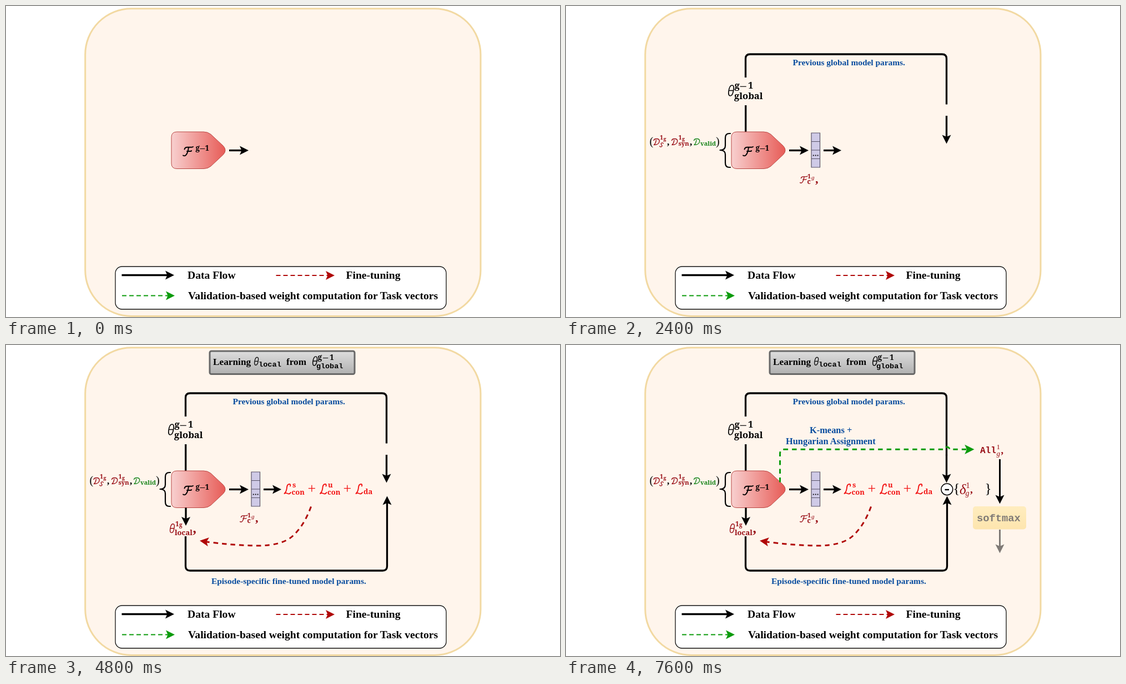
Animation of 998x561 px, one loop 8 s. Source, as an HTML page:

```html
<!DOCTYPE html>
<html lang="en">
<head>
<meta charset="utf-8">
<title>Local parameter learning</title>
<style>
html, body { margin: 0; width: 100%; height: 100%; overflow: hidden; background: #fff; }
svg { display: block; width: 100vw; height: 100vh; }
text { fill: currentColor; font: bold 19.6px "Liberation Serif", "Times New Roman", serif; white-space: pre; }
.math { font-family: "Noto Serif", serif; font-size: 13px; }
.it { font-weight: normal; font-style: italic; }
.thin { font-weight: normal; }
.mono { font-family: "Liberation Mono", "Courier New", monospace; }
.wine { color: #980c14; }
.brick { color: #b00808; }
.red { color: #f21212; }
.green { color: #0b9b0b; }
.leaf { color: #16841a; }
.blue { color: #084c9e; }
.line { fill: none; stroke: currentColor; stroke-width: 3.3; }
.fine { stroke-width: 3; }
.dash { stroke-width: 3; stroke-dasharray: 8.5 7; }
.key { stroke-width: 2; stroke-dasharray: 8 5; }
.pen { fill: none; stroke: currentColor; stroke-linecap: round; stroke-linejoin: round; }
.tip { fill: currentColor; }

/* each step: half opacity for 400 ms, then solid until the loop restarts */
.step { opacity: 0; animation: 8s step-end infinite; }
.s0 { animation-name: a0; } .s1 { animation-name: a1; } .s2 { animation-name: a2; }
.s3 { animation-name: a3; } .s4 { animation-name: a4; } .s5 { animation-name: a5; }
.s6 { animation-name: a6; } .s7 { animation-name: a7; } .s8 { animation-name: a8; }
.s9 { animation-name: a9; }
@keyframes a0 { 0% { opacity: 0 } 5% { opacity: .5 } 10%, 100% { opacity: 1 } }
@keyframes a1 { 0% { opacity: 0 } 15% { opacity: .5 } 20%, 100% { opacity: 1 } }
@keyframes a2 { 0% { opacity: 0 } 25% { opacity: .5 } 30%, 100% { opacity: 1 } }
@keyframes a3 { 0% { opacity: 0 } 35% { opacity: .5 } 40%, 100% { opacity: 1 } }
@keyframes a4 { 0% { opacity: 0 } 45% { opacity: .5 } 50%, 100% { opacity: 1 } }
@keyframes a5 { 0% { opacity: 0 } 55% { opacity: .5 } 60%, 100% { opacity: 1 } }
@keyframes a6 { 0% { opacity: 0 } 65% { opacity: .5 } 70%, 100% { opacity: 1 } }
@keyframes a7 { 0% { opacity: 0 } 75% { opacity: .5 } 80%, 100% { opacity: 1 } }
@keyframes a8 { 0% { opacity: 0 } 85% { opacity: .5 } 90%, 100% { opacity: 1 } }
@keyframes a9 { 0% { opacity: 0 } 95%, 100% { opacity: .5 } }
</style>
</head>
<body>
<svg viewBox="0 0 998 561" preserveAspectRatio="none">
  <defs>
    <linearGradient id="rose"><stop offset="0" stop-color="#f8d0cf"/><stop offset="1" stop-color="#e75c57"/></linearGradient>
    <linearGradient id="steel" x2="0" y2="1"><stop offset="0" stop-color="#dedede"/><stop offset="1" stop-color="#b0b0b0"/></linearGradient>
    <linearGradient id="gold" x2="0" y2="1"><stop offset="0" stop-color="#ffe592"/><stop offset="1" stop-color="#fcd570"/></linearGradient>
    <path id="tip" d="M0 0L-16 -8L-12.5 0L-16 8Z"/>
    <!-- math letters -->
    <path id="F" stroke-width="1.9" d="M4 5.5Q5 1.8 9 1.8H16Q18.5 1.8 19.5 .8M11.5 2Q10 13 6 16.5Q4 18 1.5 16.5M8.5 9H15Q16.2 9 16.7 8"/>
    <path id="L" stroke-width="1.9" d="M12 4.5Q13 1 10.5 1Q6.5 1 6 7Q5.5 14 1.5 18Q4 16.3 7.5 18Q11 19.5 13 16"/>
    <path id="D" stroke-width="1.4" d="M1 4Q2 1 6 1Q11.5 1 11.2 5.5Q10.5 12 1.5 12Q4.8 9 5.3 3.5"/>
    <path id="S" stroke-width="1.2" d="M7.5 2Q7 .6 5 .8Q2.5 1.2 3.5 3.5Q6 6 4.5 7.5Q2.5 9 .7 7"/>
    <path id="theta" stroke-width="1.7" d="M7.5 1Q11.5 1 10.5 8Q9 20 4.5 20Q.5 20 1.5 12Q3 1 7.5 1ZM2 10.5H10"/>
  </defs>

  <rect width="998" height="561" fill="#fff"/>
  <rect x="142.7" y="4.7" width="712.3" height="554.8" rx="83" fill="#fff5ec" stroke="#f2d9a2" stroke-width="3"/>

  <!-- legend -->
  <rect x="197" y="470" width="596" height="77" rx="12" fill="#fff" stroke="#111" stroke-width="1.3"/>
  <path class="line" d="M208.5 485.5H292"/>
  <use href="#tip" class="tip" transform="translate(303 485.5)"/>
  <g class="brick">
    <path class="line key" d="M486.5 486H580"/>
    <use href="#tip" class="tip" transform="translate(592 486)"/>
  </g>
  <g class="green">
    <path class="line key" d="M209 522.5H292"/>
    <use href="#tip" class="tip" transform="translate(304 522.5)"/>
  </g>
  <text x="327" y="492">Data Flow</text>
  <text x="612.5" y="492">Fine-tuning</text>
  <text x="328" y="529">Validation-based weight computation for Task vectors</text>

  <!-- top route, drawn beneath the encoder -->
  <g class="step s1">
    <path class="line" d="M323.7 228V179M323.5 129V95Q323.5 87 331.5 87H677.5Q685.5 87 685.5 95V177.5M685.5 198V238"/>
    <use href="#tip" class="tip" transform="translate(685.5 248.5) rotate(90)"/>
    <use href="#theta" class="pen" transform="translate(291.5 142)"/>
    <text class="math" x="303.5 328" y="149" style="font-size:16.5px">g1</text>
    <text class="math thin" x="312.5" y="153" style="font-size:24px">−</text>
    <text class="math" x="303" y="168" style="font-size:16.5px">global</text>
    <text class="blue" x="408.5" y="107" style="font-size:15.4px">Previous global model params.</text>
  </g>

  <!-- encoder -->
  <path d="M308 227H356Q363.5 227 369 231.5L391.5 252.5Q398.5 260.3 391.5 268L369 289Q363.5 293.5 356 293.5H308Q298 293.5 298 284V236.5Q298 227 308 227Z" fill="url(#rose)" stroke="#b84744"/>
  <use href="#F" class="pen" transform="translate(317.5 253)"/>
  <text class="math" x="341.5 358.5" y="261" style="font-size:13.5px">g1</text>
  <text class="math thin" x="348.5" y="263.5" style="font-size:19px">−</text>
  <path class="line" d="M402 260.5H426"/>
  <use href="#tip" class="tip" transform="translate(437 260.5)"/>

  <!-- data sets -->
  <g class="step s0">
    <path class="pen" stroke-width="2.2" d="M296 230H294Q287 230 287 238V252Q287 260 277.5 260Q287 260 287 268V283Q287 291 294 291H296"/>
    <text class="thin" x="150.5" y="251" style="font-size:20px">(</text>
    <text class="thin" x="270" y="251" style="font-size:20px">)</text>
    <g class="wine">
      <use href="#D" class="pen" transform="translate(157 238.5)"/>
      <use href="#S" class="pen" transform="translate(168 246)"/>
      <text class="math" x="169" y="241" style="font-size:11px">1</text>
      <text class="math" x="175.5" y="242.5" style="font-size:9px">g</text>
      <use href="#D" class="pen" transform="translate(189.5 238.5)"/>
      <text class="math" x="202.5" y="241" style="font-size:11px">1</text>
      <text class="math" x="209" y="242.5" style="font-size:9px">g</text>
      <text class="math" x="202.5" y="251.5" style="font-size:11px">syn</text>
    </g>
    <text x="182 223" y="250.5" style="font-size:17px">,,</text>
    <g class="leaf">
      <use href="#D" class="pen" transform="translate(229.5 238.5)"/>
      <text class="math" x="242" y="251.5" style="font-size:11px">valid</text>
    </g>
  </g>

  <!-- feature vector -->
  <g class="step s2">
    <path d="M442 229H457.5V291H442ZM442 244.5H457.5M442 260H457.5M442 275.5H457.5" fill="#cfcae7" stroke="#575266" stroke-width="1.2"/>
    <path class="pen" stroke-width="2.2" d="M445.8 269.5h0M449.7 269.5h0M453.6 269.5h0"/>
    <path class="line" d="M464 260.5H485"/>
    <use href="#tip" class="tip" transform="translate(496 260.5)"/>
    <g class="wine">
      <use href="#F" class="pen" transform="translate(420.5 306.5) scale(.74)"/>
      <text class="math" x="435" y="311" style="font-size:11px">1</text>
      <text class="it" x="442" y="312.5" style="font-size:11px">g</text>
      <text class="math" x="434.5" y="321" style="font-size:12px">c</text>
      <text x="449" y="318.5" style="font-size:22px">,</text>
    </g>
  </g>

  <!-- losses -->
  <g class="step s3">
    <g class="red">
      <use href="#L" class="pen" transform="translate(500 250)"/>
      <text class="math" x="516" y="257">s</text>
      <text class="math" x="514.5" y="269.5">con</text>
      <text class="thin" x="543.5" y="267" style="font-size:26px">+</text>
      <use href="#L" class="pen" transform="translate(564.5 250)"/>
      <text class="math" x="580" y="257">u</text>
      <text class="math" x="579" y="269.5">con</text>
      <text class="thin" x="607.5" y="267" style="font-size:26px">+</text>
      <use href="#L" class="pen" transform="translate(629 250)"/>
      <text class="math" x="644" y="268.5">da</text>
    </g>
    <g class="brick">
      <path class="line dash" d="M549.5 291.5Q537 326 516 345Q497 361.5 455 362Q410 361.5 361 355"/>
      <use href="#tip" class="tip" transform="translate(349 353) rotate(188)"/>
    </g>
  </g>

  <!-- title and local parameters -->
  <g class="step s4">
    <rect x="367" y="11" width="261" height="41.5" rx="3" fill="url(#steel)" stroke="#686868" stroke-width="3"/>
    <text x="373" y="36" style="font-size:17.3px">Learning</text>
    <use href="#theta" class="pen" transform="translate(446.7 21.5) scale(.74)"/>
    <text class="mono" x="455" y="39" style="font-size:13.6px">local</text>
    <text x="505" y="36" style="font-size:17.2px">from</text>
    <use href="#theta" class="pen" transform="translate(551.5 20) scale(.85)"/>
    <text class="math" x="561.5 583" y="27" style="font-size:14px">g1</text>
    <text class="math thin" x="570" y="30" style="font-size:20px">−</text>
    <text class="mono" x="559" y="42" style="font-size:13.4px">global</text>
    <path class="line" d="M324 293.5V315"/>
    <use href="#tip" class="tip" transform="translate(324 326) rotate(90)"/>
    <g class="wine">
      <use href="#theta" class="pen" transform="translate(294.5 322) scale(.83)"/>
      <text class="math" x="305" y="326.5" style="font-size:12px">1</text>
      <text class="math" x="312" y="328" style="font-size:10px">g</text>
      <text class="math" x="304" y="342.5">local</text>
      <text x="336.5" y="338.5" style="font-size:25px">,</text>
    </g>
  </g>

  <!-- bottom route -->
  <g class="step s5">
    <path class="line" d="M323.5 345V399Q323.5 407 331.5 407H678.5Q686.5 407 686.5 399V283"/>
    <use href="#tip" class="tip" transform="translate(686.5 272.5) rotate(-90)"/>
    <text class="blue" x="370" y="430.5" style="font-size:15.4px">Episode-specific fine-tuned model params.</text>
  </g>

  <!-- difference -->
  <g class="step s6">
    <circle cx="686.3" cy="260.3" r="10.4" fill="#fff" stroke="#000" stroke-width="1.5"/>
    <path class="line" style="stroke-width:2.4px" d="M682.5 261H690"/>
    <text class="thin" x="697.5" y="267" style="font-size:25px">{</text>
    <text class="thin" x="754.5" y="267" style="font-size:25px">}</text>
    <g class="wine">
      <text class="it" x="709" y="268.5" style="font-size:25px">δ</text>
      <text class="thin" x="720.5" y="258" style="font-size:14px">1</text>
      <text class="it" x="719.5" y="272" style="font-size:14px">g</text>
      <text x="728" y="267" style="font-size:19px">,</text>
    </g>
  </g>

  <!-- assignment route -->
  <g class="step s7">
    <path class="line" d="M685.5 177V199"/>
    <g class="green">
      <path class="line dash" d="M385.5 247.5V196Q385.5 188.3 393.5 188.3H680Q680.5 184 685.5 184Q690.5 184 691 188.3H724"/>
      <use href="#tip" class="tip" transform="translate(735.5 188.3) scale(1.08)"/>
    </g>
    <g class="blue">
      <text x="439" y="158.5" style="font-size:16.4px">K-means +</text>
      <text x="396" y="179" style="font-size:16.4px">Hungarian Assignment</text>
    </g>
  </g>

  <!-- per-class scores -->
  <g class="step s8">
    <g class="wine">
      <text class="mono" x="746" y="195" style="font-size:16px">All</text>
      <text class="thin" x="775.5" y="188" style="font-size:13px">1</text>
      <text class="it" x="775.5" y="200" style="font-size:13px">g</text>
      <text x="783.5" y="195.5" style="font-size:18px">,</text>
    </g>
    <path class="line fine" d="M781.5 206V276"/>
    <use href="#tip" class="tip" transform="translate(781.5 286.5) rotate(90)"/>
  </g>

  <!-- softmax -->
  <g class="step s9">
    <rect x="733" y="291" width="96" height="41.5" rx="5" fill="url(#gold)"/>
    <text class="mono" x="740" y="318" style="font-size:18.8px">softmax</text>
    <path class="line fine" d="M781.5 333V365"/>
    <use href="#tip" class="tip" transform="translate(781.5 375.5) rotate(90)"/>
  </g>
</svg>
</body>
</html>
```
